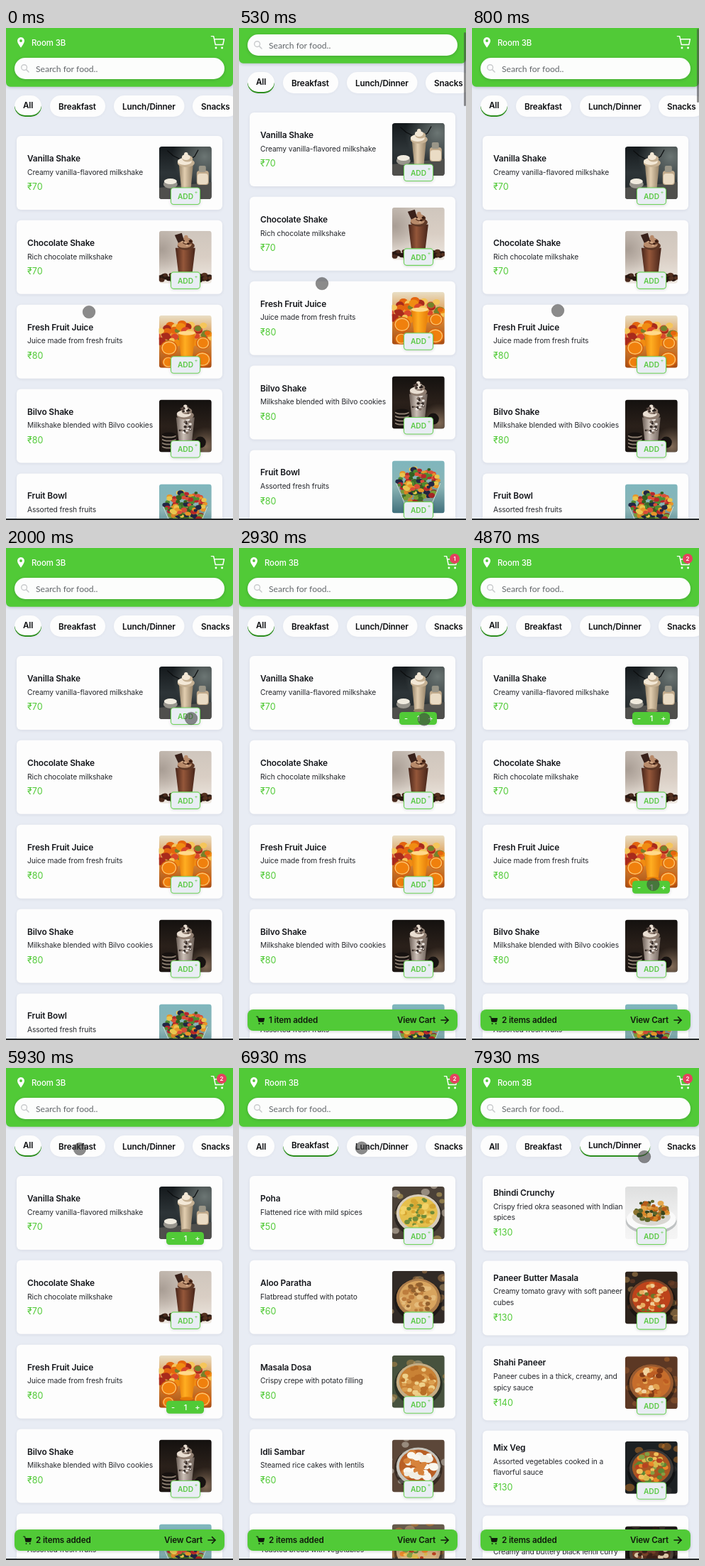
Write an HTML page with a canvas that moves like this. It is 320 by 693 pixels and loops after 8000 ms.

```html
<!DOCTYPE html>
<html lang="en">
<head>
<meta charset="utf-8">
<title>Food ordering</title>
<style>
html, body { margin: 0; width: 100%; height: 100%; overflow: hidden; background: #e8ecf4; }
canvas { display: block; width: 320px; height: 693px; }
</style>
</head>
<body>
<canvas id="stage"></canvas>
<script>
const W = 320, H = 693, LOOP = 8000;
const GREEN = '#51ca37', INK = '#15171c', SANS = 'Inter, sans-serif';
const canvas = document.getElementById('stage');
const c = canvas.getContext('2d');
const dpr = window.devicePixelRatio || 1;
canvas.width = W * dpr;
canvas.height = H * dpr;

// Event times in ms
const ADD_FIRST = 2250, ADD_SECOND = 4760, TO_BREAKFAST = 5990, TO_LUNCH = 7290;

// Pointer stops: time, x, y
const STOPS = [
  [0, 117, 400], [70, 117, 400], [530, 117, 360], [800, 121, 398], [1150, 123, 398],
  [1900, 260, 240], [2000, 261, 240], [2900, 261, 241], [3800, 259, 352], [4000, 259, 354],
  [4600, 256, 474], [5050, 255, 474], [5800, 108, 117], [5930, 104, 114], [6500, 104, 114],
  [7180, 203, 112], [7500, 205, 114], [7800, 221, 140], [7930, 243, 125], [8000, 252, 118]
];

const clamp = v => Math.max(0, Math.min(1, v));
const ease = v => v * v * (3 - 2 * v);

function pointer(t) {
  const i = STOPS.findIndex(s => s[0] > t);
  const a = STOPS[i - 1], b = STOPS[i];
  const k = ease((t - a[0]) / (b[0] - a[0]));
  return [a[1] + (b[1] - a[1]) * k, a[2] + (b[2] - a[2]) * k];
}

function random(seed) {
  return () => (seed = seed * 16807 % 2147483647) / 2147483647;
}

// y is the middle of the capitals
function text(str, x, y, size, color, weight = 400, gap = 0, align = 'left', family = SANS) {
  c.font = `${weight} ${size}px ${family}`;
  c.letterSpacing = gap + 'px';
  c.textAlign = align;
  c.fillStyle = color;
  c.fillText(str, x, y + size * 0.364);
}

function box(x, y, w, h, r, fill, shadow) {
  c.save();
  if (shadow) {
    c.shadowColor = `rgba(20,30,50,${shadow})`;
    c.shadowBlur = 4 * dpr;
    c.shadowOffsetY = dpr;
  }
  c.beginPath();
  c.roundRect(x, y, w, h, r);
  c.fillStyle = fill;
  c.fill();
  c.restore();
}

function oval(x, y, rx, ry, fill) {
  c.beginPath();
  c.ellipse(x, y, rx, ry, 0, 0, 7);
  c.fillStyle = fill;
  c.fill();
}

function poly(pts, fill) {
  c.beginPath();
  pts.forEach(p => c.lineTo(p[0], p[1]));
  c.fillStyle = fill;
  c.fill();
}

function line(pts, color, width) {
  c.beginPath();
  pts.forEach(p => c.lineTo(p[0], p[1]));
  c.strokeStyle = color;
  c.lineWidth = width;
  c.lineCap = c.lineJoin = 'round';
  c.stroke();
}

function backdrop(...colors) {
  const g = c.createLinearGradient(0, 0, 0, 74);
  colors.forEach((col, i) => g.addColorStop(i / (colors.length - 1), col));
  c.fillStyle = g;
  c.fillRect(0, 0, 74, 74);
}

function glow(x, y, r, color) {
  const g = c.createRadialGradient(x, y, 0, x, y, r);
  g.addColorStop(0, color);
  g.addColorStop(1, color + '00');
  c.fillStyle = g;
  c.fillRect(0, 0, 74, 74);
}

function bits(seed, n, x, y, rx, ry, size, colors) {
  const rnd = random(seed);
  for (let i = 0; i < n; i++) {
    const a = rnd() * 6.28, d = Math.sqrt(rnd()), s = size * (0.6 + rnd() * 0.6);
    oval(x + Math.cos(a) * d * rx, y + Math.sin(a) * d * ry, s, s * 0.8, colors[i % colors.length]);
  }
}

function glass(x, top, bottom, half, body, shade) {
  const g = c.createLinearGradient(x - half, 0, x + half, 0);
  g.addColorStop(0, shade);
  g.addColorStop(0.4, body);
  g.addColorStop(1, shade);
  poly([[x - half, top], [x + half, top], [x + half * 0.65, bottom], [x - half * 0.65, bottom]], g);
  oval(x, bottom, half * 0.8, 2.5, shade);
}

function cream(x, y, color, shade) {
  oval(x, y, 12, 6, shade);
  oval(x - 2, y - 2, 10, 5, color);
  oval(x + 2, y - 6, 7.5, 4.5, shade);
  oval(x, y - 8, 6, 4, color);
  oval(x, y - 12, 2.8, 3, color);
}

// A dish seen from above, filled with scattered pieces
function dish(seed, bg, rim, base, colors, y = 38, rx = 31, ry = 27, size = 4) {
  return () => {
    backdrop(bg, bg);
    bits(seed + 5, 16, 37, 37, 46, 46, 6, [rim + '88', colors[0] + '66']);
    oval(37, y + 3, rx + 3, ry + 3, '#0006');
    oval(37, y, rx, ry, rim);
    oval(37, y - 1, rx - 4, ry - 4, base);
    bits(seed, 48, 37, y - 1, rx - 8, ry - 7, size, colors);
  };
}

function vanilla() {
  backdrop('#14191c', '#2d3437', '#23282a');
  glow(64, 14, 46, '#6c7674');
  poly([[0, 58], [74, 50], [74, 74], [0, 74]], '#4f4f4c');
  line([[12, 6], [20, 13], [34, 20]], '#0b0d0e', 1.3);
  line([[55, 5], [50, 14], [40, 20]], '#0b0d0e', 1.3);
  box(53, 34, 17, 20, 4, '#c2ab8c');
  box(54, 38, 15, 15, 4, '#eadcc5');
  box(56, 27, 10, 9, 2, '#9a9688');
  oval(16, 53, 10, 6, '#98958d');
  oval(16, 49, 9, 4, '#f0ebdf');
  glass(38, 25, 62, 10, '#e2ceb0', '#968368');
  cream(38, 23, '#f3e8d6', '#c6b193');
}

function chocolate() {
  backdrop('#cfc6bd', '#d9cec4', '#eee8e1');
  glow(4, 26, 40, '#a89d94');
  bits(23, 18, 14, 66, 15, 6, 4, ['#281711', '#48291d']);
  bits(41, 16, 60, 67, 13, 5, 4, ['#281711', '#54301f']);
  glass(37, 24, 65, 14, '#95573a', '#462419');
  cream(38, 21, '#b78a6a', '#5e3826');
  bits(12, 9, 38, 15, 9, 7, 2, ['#35190f', '#d2aa88']);
  poly([[22, 6], [32, 3], [35, 13], [27, 17]], '#39211a');
}

function juice() {
  backdrop('#e9dfc6', '#d98a35', '#a84c12');
  bits(77, 60, 37, 29, 42, 19, 6, ['#f08c12', '#a82a1c', '#e4650f', '#74822b', '#d9472a', '#f5c55a']);
  for (const [x, y, r] of [[14, 46, 12], [62, 39, 10], [61, 62, 12], [13, 66, 9]]) {
    oval(x, y, r, r * 0.9, '#d9620a');
    oval(x, y, r - 1.5, r * 0.78, '#fbc069');
    oval(x, y, r - 3, r * 0.65, '#f0800d');
  }
  glass(39, 25, 61, 12, '#ffae21', '#e57a08');
  oval(39, 25, 12, 3, '#ffd98a');
}

function cookie() {
  backdrop('#14110f', '#2a201a', '#1b1512');
  glow(66, 66, 28, '#826b57');
  for (const y of [64, 59, 54, 49]) {
    oval(14, y + 2, 10, 3, '#8d7e70');
    oval(14, y, 10, 3, '#171210');
  }
  oval(58, 60, 8, 8, '#171311');
  glass(37, 25, 66, 13, '#cbbfb6', '#6b5e56');
  bits(19, 26, 37, 38, 9, 12, 2, ['#342a26', '#eee7e2', '#7b6b60']);
  cream(37, 22, '#e9ded2', '#8f7d70');
  bits(33, 12, 37, 15, 8, 7, 1.8, ['#241b18', '#51413a']);
}

function fruit() {
  backdrop('#7fb6bd', '#8ab4b5', '#41707c');
  poly([[5, 30], [69, 30], [54, 67], [20, 67]], '#7d9a94');
  bits(91, 60, 37, 44, 22, 17, 4, ['#a52423', '#3d6b2b', '#d98325', '#1f2540', '#7a9b36']);
  bits(58, 90, 37, 28, 29, 18, 4, ['#b8272a', '#e8952a', '#4f8a30', '#222745', '#d94f38', '#e8c64f', '#33601f']);
  line([[6, 32], [20, 66], [54, 66], [68, 32]], '#cfdfda', 1);
}

function okra() {
  backdrop('#dedfdf', '#eeeeee', '#f5f5f5');
  oval(37, 49, 36, 18, '#bfc2c3');
  oval(37, 46, 35, 17, '#fafafa');
  oval(37, 43, 27, 12, '#d9d8d3');
  bits(29, 65, 37, 34, 23, 14, 3.7, ['#5d6529', '#d68427', '#8d7330', '#b65b18', '#37451d', '#e4a64a']);
}

const paneer = ['#e7ae61', '#b8431c', '#d76b27', '#efcf98', '#6b7728'];
const curry = ['#cc782f', '#bd5c22', '#f1d29f', '#e3a452', '#843b17'];
const veg = ['#ea892a', '#5b8633', '#d9b94b', '#b74120', '#839f43', '#f0c05a'];

const MENUS = [
  { pitch: 118.85, height: 104, items: [
    ['Vanilla Shake', ['Creamy vanilla-flavored milkshake'], 70, vanilla],
    ['Chocolate Shake', ['Rich chocolate milkshake'], 70, chocolate],
    ['Fresh Fruit Juice', ['Juice made from fresh fruits'], 80, juice],
    ['Bilvo Shake', ['Milkshake blended with Bilvo cookies'], 80, cookie],
    ['Fruit Bowl', ['Assorted fresh fruits'], 80, fruit]
  ] },
  { pitch: 118.85, height: 104, items: [
    ['Poha', ['Flattened rice with mild spices'], 50, dish(8, '#4b4138', '#d8cdbb', '#e5bf4c', ['#f2d266', '#d6a632', '#6f8c39'])],
    ['Aloo Paratha', ['Flatbread stuffed with potato'], 60, dish(14, '#312a26', '#ad7d4a', '#d8a45e', ['#e4bb7b', '#bd7d3d', '#92602e'])],
    ['Masala Dosa', ['Crispy crepe with potato filling'], 80, dish(32, '#47523e', '#c5ad84', '#c98235', ['#db9e4f', '#b96e27', '#eed08a'])],
    ['Idli Sambar', ['Steamed rice cakes with lentils'], 60, dish(51, '#5c4739', '#c6c4bc', '#b95f25', ['#f1eee4', '#d7833b', '#faf7ef'], 38, 31, 27, 6)],
    ['Veg Sandwich', ['Toasted bread with vegetables'], 60, dish(62, '#665a4b', '#c9a578', '#d5b37f', veg)]
  ] },
  { pitch: 119.6, height: 105, items: [
    ['Bhindi Crunchy', ['Crispy fried okra seasoned with Indian', 'spices'], 130, okra],
    ['Paneer Butter Masala', ['Creamy tomato gravy with soft paneer', 'cubes'], 130, dish(17, '#2c231c', '#754329', '#bd431b', paneer)],
    ['Shahi Paneer', ['Paneer cubes in a thick, creamy, and', 'spicy sauce'], 140, dish(37, '#5c3824', '#975a30', '#c66d2c', curry)],
    ['Mix Veg', ['Assorted vegetables cooked in a', 'flavorful sauce'], 130, dish(59, '#1c2022', '#393837', '#a95722', veg)],
    ['Dal Makhani', ['Creamy and buttery black lentil curry'], 140, dish(73, '#1e1a18', '#4a4038', '#56301f', ['#3c2118', '#784229', '#d9c4a5'])]
  ] }
];

const CHIPS = [['All', 12, 38], ['Breakfast', 62, 78], ['Lunch/Dinner', 152, 99.5], ['Snacks', 263, 65]];

function cart(x, y, s, color, solid) {
  c.save();
  c.translate(x, y);
  c.scale(s, s);
  const basket = [[6, 6], [23, 6], [21, 15.5], [8, 15.5]];
  if (solid) poly(basket, color);
  line([[1, 1], [5, 1], ...basket.slice(0, 3), basket[3], basket[0]], color, solid ? 2.4 : 1.8);
  oval(9, 21, 1.8, 1.8, color);
  oval(19.5, 21, 1.8, 1.8, color);
  c.restore();
}

function header(count) {
  box(0, -8, W, 90.7, 6, GREEN, 0.22);
  c.beginPath();
  c.arc(21, 18, 5, Math.PI * 0.9, Math.PI * 2.1);
  c.quadraticCurveTo(25, 22.5, 21, 27.8);
  c.quadraticCurveTo(17, 22.5, 16.2, 19.5);
  c.fillStyle = '#fff';
  c.fill();
  oval(21, 18, 1.9, 1.9, GREEN);
  text('Room 3B', 36, 20.5, 11.4, '#fff', 500, -0.1);
  cart(288.6, 10.8, 0.82, '#fff');
  if (count) {
    oval(304, 15, 7, 7, '#e5405f');
    text(count, 304, 15, 8, '#fff', 600, 0, 'center');
  }
  box(12, 42, 296, 30, 15, '#fcfdfc', 0.2);
  c.beginPath();
  c.arc(25.6, 55.6, 3.9, 0, 7);
  c.strokeStyle = '#c9cbcd';
  c.lineWidth = 1.4;
  c.stroke();
  line([[28.6, 58.6], [32, 62]], '#c9cbcd', 1.6);
  text('Search for food..', 42, 57.3, 12.1, '#62666a', 400, 0, 'left', 'Lato, sans-serif');
}

function chip([label, x, w], active) {
  const y = 95, h = 30;
  box(x, y, w, h, 15, '#fdfdfd', 0.04);
  if (active) {
    // Crescent: the pill minus the same pill raised by 2
    c.save();
    c.beginPath();
    c.rect(x, y + h / 2, w, h / 2);
    c.clip();
    box(x, y, w, h, 15, '#2b8d1d');
    box(x, y - 2, w, h, 15, '#fdfdfd');
    c.restore();
  }
  text(label, x + 12, active ? 109.1 : 110.4, 11.7, '#0c0d10', 600, -0.15);
}

function addButton(y) {
  box(232.5, y, 41, 23.5, 4, '#e9edf4', 0.22);
  c.beginPath();
  c.roundRect(232.5, y, 41, 23.5, 4);
  c.strokeStyle = '#6fd45a';
  c.lineWidth = 1.1;
  c.stroke();
  text('ADD', 253, y + 12, 10.2, '#5ac944', 600, 0, 'center');
  text('+', 268, y + 6, 7.5, '#67d150', 400, 0, 'center');
}

function counter(y) {
  box(226, y + 6, 53, 18, 4.5, GREEN, 0.15);
  text('-', 235.5, y + 15, 11, '#fff', 500, 0, 'center');
  text('1', 253, y + 15, 11, '#fff', 500, 0, 'center');
  text('+', 270, y + 15, 11, '#fff', 500, 0, 'center');
}

function card([name, lines, price, paint], y, height, added) {
  box(15, y, 290, height, 6, '#fdfdfd', 0.08);
  const top = y + 31.7 - (lines.length - 1) * 8;
  text(name, 30, top, 11.9, INK, 600, -0.13);
  lines.forEach((s, i) => text(s, 30, top + 19.3 + i * 15.7, 10.25, '#25272c', 400, -0.1));
  text('₹' + price, 30, top + 40.2 + (lines.length - 1) * 16, 12.5, GREEN);
  c.save();
  c.translate(215.8, y + 15);
  c.beginPath();
  c.roundRect(0, 0, 74, 74, 4);
  c.clip();
  paint();
  c.restore();
  (added ? counter : addButton)(y + 73);
}

function cartBar(count, y) {
  box(12, y, 296, 30, 8, GREEN, 0.2);
  cart(24, y + 9.5, 0.5, '#10190d', true);
  text(count > 1 ? count + ' items added' : '1 item added', 42, y + 15, 11.7, '#10190d', 600, -0.15);
  text('View Cart', 223, y + 15, 11.7, '#10190d', 600, -0.15);
  line([[285, y + 15], [295, y + 15]], '#10190d', 1.6);
  line([[290.5, y + 10.5], [295, y + 15], [290.5, y + 19.5]], '#10190d', 1.6);
}

function draw(t) {
  const [px, py] = pointer(t);
  const scroll = t < 900 ? Math.max(0, 393 - py) : 0;
  const tab = t < TO_BREAKFAST ? 0 : t < TO_LUNCH ? 1 : 2;
  const count = (t >= ADD_FIRST) + (t >= ADD_SECOND);
  const menu = MENUS[tab];

  c.setTransform(dpr, 0, 0, dpr, 0, 0);
  c.fillStyle = '#e8ecf4';
  c.fillRect(0, 0, W, H);

  c.save();
  c.translate(0, -scroll);
  menu.items.forEach((item, i) => {
    const added = tab === 0 && (i === 0 && count > 0 || i === 2 && count > 1);
    card(item, 152 + i * menu.pitch, menu.height, added);
  });
  CHIPS.forEach((item, i) => chip(item, i === tab));
  header(count);
  c.restore();

  if (count) cartBar(count, 650 + 48 * (1 - ease(clamp((t - ADD_FIRST) / 250))));

  const thumb = clamp((t - 110) / 60) * clamp((1500 - t) / 250);
  if (thumb) box(317, 1 + scroll * 0.15, 3, 104, 1.5, `rgba(70,70,70,${0.6 * thumb})`);

  oval(px, py, 8.8, 8.8, 'rgba(64,64,64,.6)');
  c.strokeStyle = 'rgba(64,64,64,.4)';
  c.lineWidth = 0.8;
  c.stroke();

  c.fillStyle = '#24282a';
  c.fillRect(0, 691, W, 2);
}

const start = performance.now();
function tick() {
  draw((performance.now() - start) % LOOP);
  requestAnimationFrame(tick);
}
tick();
</script>
</body>
</html>
```
